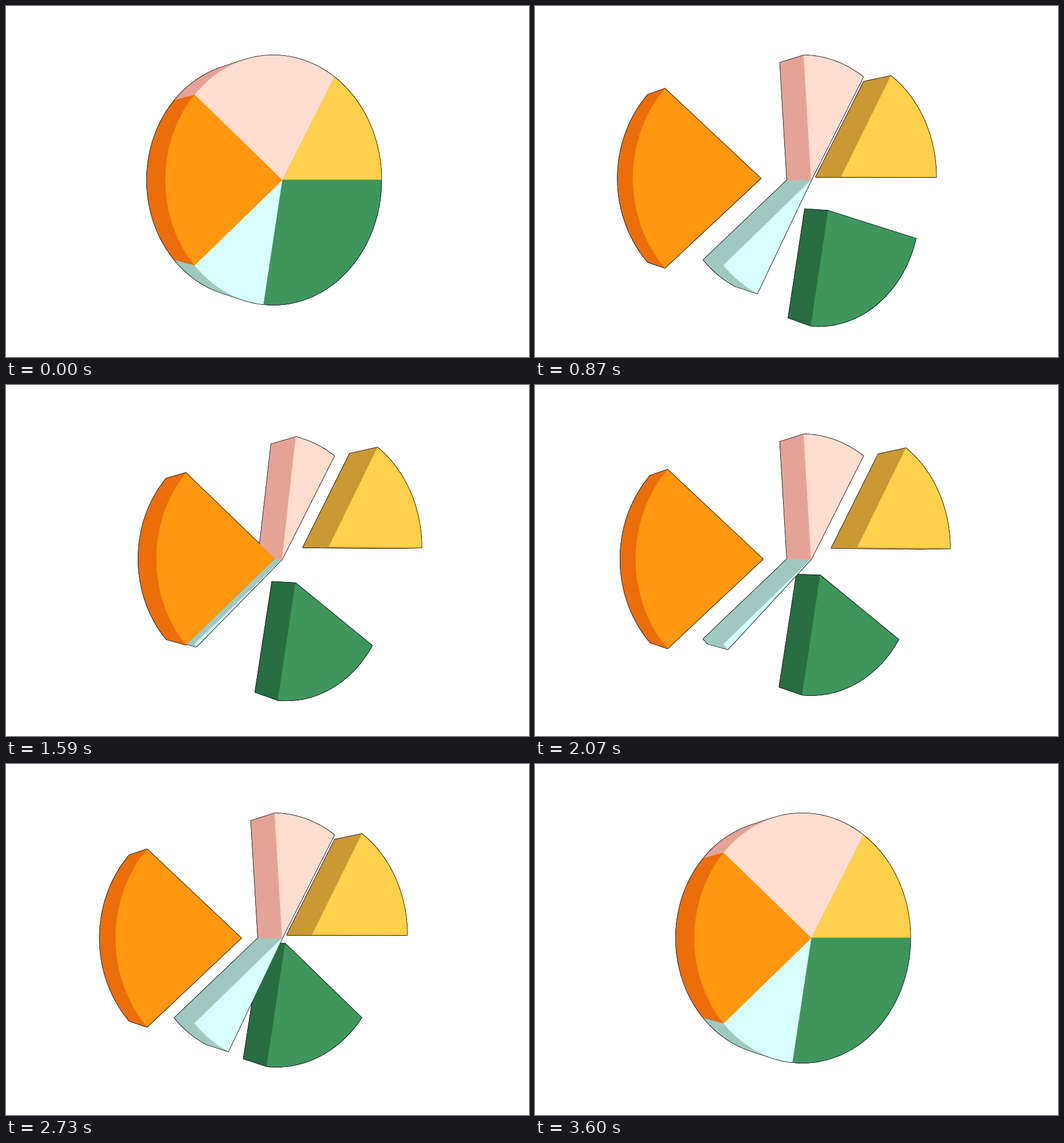
Animation of 913 by 613 pixels, one loop 3630 ms. Source, as an HTML page with a canvas:

```html
<!DOCTYPE html>
<html lang="en">
<head>
<meta charset="utf-8">
<title>Pie chart</title>
<style>
  html, body { margin: 0; width: 100%; height: 100%; overflow: hidden; background: #fff; }
  canvas { display: block; }
</style>
</head>
<body>
<canvas id="stage" width="913" height="613"></canvas>
<script>
const ctx = document.getElementById('stage').getContext('2d');
const LOOP = 3630, STEP = 30, HALF = 1800;
const RADIUS = .994, THICKNESS = .97;

// Progress from 0 to 1 between two times.
const ramp = (t, from, to) => Math.min(1, Math.max(0, (t - from) / (to - from)));
const smooth = (t, from, to) => (1 - Math.cos(Math.PI * ramp(t, from, to))) / 2;
const easeOut = (t, from, to) => Math.sin(Math.PI / 2 * ramp(t, from, to));
// Quick way out, a rest, then a slower way home.
const trip = (t, start, out, leave, home) => ramp(t, start, out) - ramp(t, leave, home);

// Perspective view of a unit disc turned about the vertical axis.
function project(x, y, z) {
  const w = 1 + .0818 * x + .0651 * z;
  return [(482 + 227.7 * x - 14.4 * z) / w, 304 - 218.3 * y / w];
}

function polygon(points) {
  const path = new Path2D();
  points.forEach(p => path.lineTo(...p));
  path.closePath();
  return path;
}

function slice(from, to, face, side, dx = 0, dy = 0, dz = 0) {
  const rim = [[0, 0]], count = 60;
  for (let i = 0; i <= count; i++) {
    const a = (from + (to - from) * i / count) * Math.PI / 180;
    rim.push([RADIUS * Math.cos(a), RADIUS * Math.sin(a)]);
  }
  const layer = z => rim.map(([x, y]) => project(x + dx, y + dy, z + dz));
  const front = layer(0), back = layer(THICKNESS);
  const walls = front.map((p, i) => {
    const j = (i + 1) % front.length;
    return polygon([p, front[j], back[j], back[i]]);
  });
  return { top: polygon(front), walls: [polygon(back), ...walls], face, side };
}

function slicesAt(t) {
  const m = HALF - Math.abs(t - HALF);  // parts that run back the way they came
  const orange = .659 * (trip(t, 0, 360, 538, 1720) + trip(t, 1825, 2181, 2250, 3415));
  const lift = t < HALF ? .027 * orange : 0;
  const green = .372 * (ramp(t, 130, 670) - smooth(t, 670, 3500));
  const greenCut = 35.5 * smooth(t, 200, 1620) + 4.5 * smooth(t, 2070, 2730) - 40 * smooth(t, 2730, 3560);
  const pinkCut = 46.1 * ramp(m, 0, 363) + 11.3 * trip(t, 1350, 1590, 1830, 2040);
  const cyanCut = 39.7 * ramp(m, 180, 1630);
  const yellow = .46 * easeOut(m, 180, HALF);
  return [
    slice(0, 59.7, '#ffd04b', '#cb9834', yellow, .125 * ramp(m, 600, HALF)),
    slice(260, 360 - greenCut, '#3f965c', '#286e41', green, -.725 * green, 2.2 * green),
    slice(220, 260 - cyanCut, '#d7ffff', '#9fc9c0'),
    slice(59.7, 140 - pinkCut, '#ffdecf', '#e5a396'),
    slice(140, 220, '#ff9710', '#eb6e08', -orange, lift, -.225 * orange)
  ];
}

function paint(path, color, width) {
  ctx.fillStyle = ctx.strokeStyle = color;
  ctx.lineWidth = width;
  ctx.fill(path);
  ctx.stroke(path);
}

function draw(t) {
  const slices = slicesAt(t);
  ctx.fillStyle = '#fff';
  ctx.fillRect(0, 0, 913, 613);
  ctx.lineJoin = 'round';
  // Outlines go below every fill, so they show only against the background.
  for (const s of slices) {
    for (const path of [...s.walls, s.top]) paint(path, '#15111f', 2.2);
  }
  for (const s of slices) {
    for (const path of s.walls) paint(path, s.side, .4);
    paint(s.top, s.face, .5);
  }
}

function tick() {
  const t = performance.now() % LOOP;
  draw(Math.floor(t / STEP) * STEP);
  requestAnimationFrame(tick);
}
tick();
</script>
</body>
</html>
```
